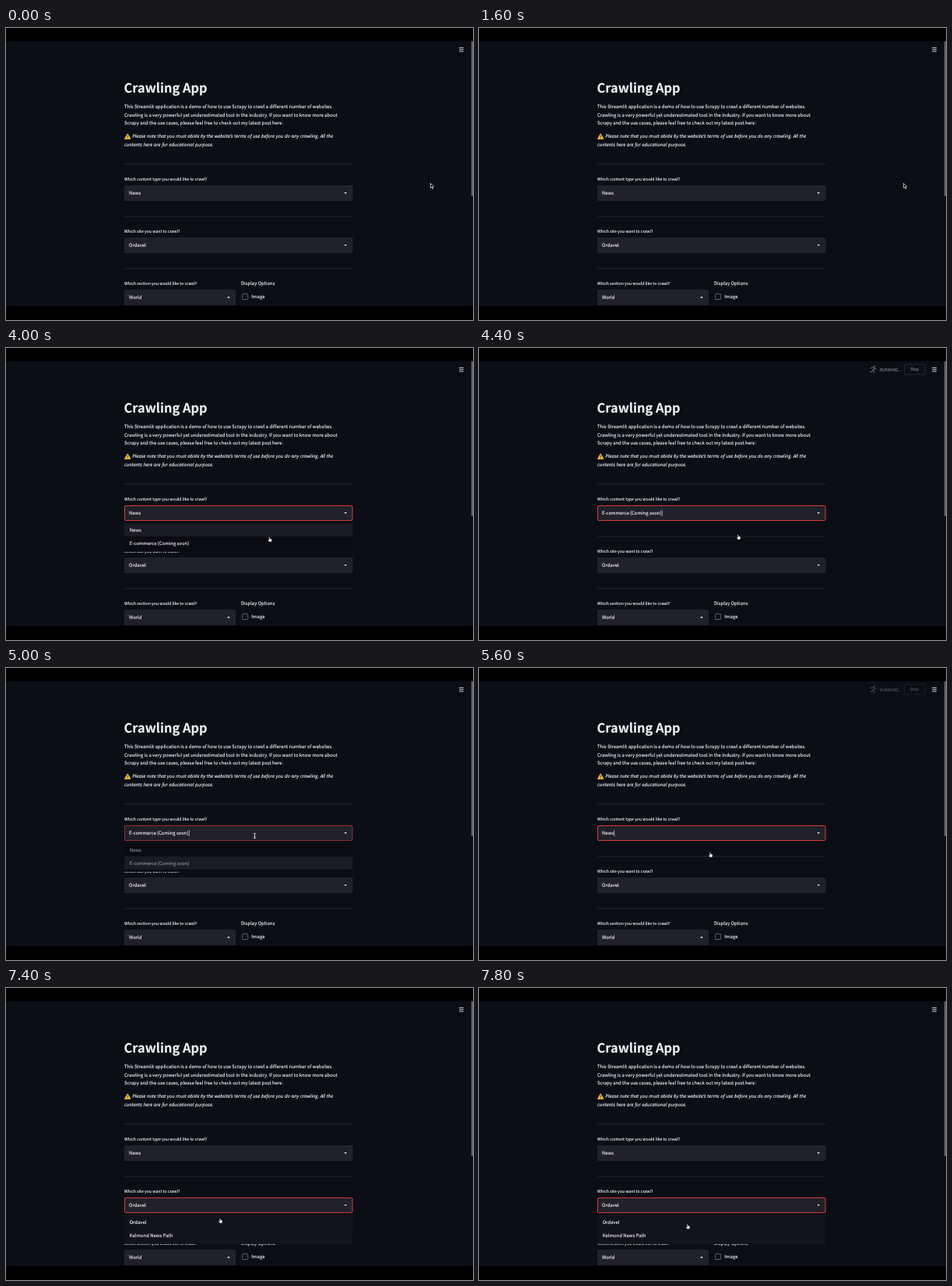
These frames come from a looping animation (600 px wide and 375 px high, 8000 ms). An HTML page:

```html
<!DOCTYPE html>
<html lang="en">
<head>
<meta charset="utf-8">
<title>Crawling App</title>
<style>
  html, body { margin: 0; width: 100%; height: 100%; overflow: hidden; background: #000; }
  svg { display: block; width: 100vw; height: 100vh; }
  text {
    font: 5.95px "Noto Sans CJK SC", "Noto Sans CJK JP", "Noto Sans CJK", "Open Sans", sans-serif;
    fill: #f4f4f5;
    stroke: #f4f4f5;
    stroke-width: .12;
    text-rendering: geometricPrecision;
    white-space: pre;
  }
  .title { font-size: 16.4px; font-weight: 700; }
  .note { font: italic 6.11px "Open Sans", "Noto Sans", sans-serif; }
  .label, .small { font-size: 5.22px; }
  .box { fill: #21212a; }
  .hr { fill: #26282e; }
  .ring { fill: none; stroke: #d23a3c; }
</style>
</head>
<body>
<svg viewBox="0 0 600 375">
  <defs>
    <clipPath id="page"><rect y="17" width="600" height="340"/></clipPath>
    <path id="chevron" d="M-1.8 -.9H1.8L0 1Z" fill="#f4f4f5"/>
  </defs>
  <rect width="600" height="375"/>
  <g clip-path="url(#page)">
    <rect y="17" width="600" height="340" fill="#0c0e15"/>
    <rect x="597.8" y="17" width="2.2" height="199" rx="1" fill="#626368"/>
    <path d="M582.2 25.4h5.6M582.2 27.7h5.6M582.2 30h5.6" stroke="#e6e6e8" stroke-width=".9"/>

    <g id="running" opacity="0">
      <g fill="none" stroke="#f4f4f5" stroke-width=".9" stroke-linecap="round" stroke-linejoin="round">
        <path d="M503.5 26l1.8-1.6 2.3.7-1.5 3 1.9 1.5-.9 2.2M506.1 28.1l-1 2.2h-2.2M507.6 25.1l.8 1.8h1.7"/>
      </g>
      <circle cx="508.4" cy="23.6" r=".9" fill="#f4f4f5"/>
      <text class="small" x="515" y="30">RUNNING...</text>
      <rect x="546.5" y="21" width="26.5" height="13" rx="1.5" fill="none" stroke="#55565f" stroke-width=".7"/>
      <text class="small" x="554" y="29.4">Stop</text>
    </g>

    <text class="title" x="151.6" y="83">Crawling App</text>
    <text x="152" y="103.3">This Streamlit application is a demo of how to use Scrapy to crawl a different number of websites.</text>
    <text x="152" y="113.8">Crawling is a very powerful yet underestimated tool in the industry. If you want to know more about</text>
    <text x="152" y="124.3">Scrapy and the use cases, please feel free to check out my latest post here:</text>
    <path d="M156.2 135.8L159.9 142.4H152.5Z" fill="#f3b93a" stroke="#f3b93a" stroke-width="1" stroke-linejoin="round"/>
    <path d="M156.2 137.6v2.6M156.2 141.2v.8" stroke="#2c2412" stroke-width=".9"/>
    <text class="note" x="162.2" y="141.4">Please note that you must abide by the website's terms of use before you do any crawling. All the</text>
    <text class="note" x="152" y="152">contents here are for educational purpose.</text>

    <rect class="hr" x="152" y="174.6" width="293.5" height=".8"/>
    <rect class="hr" x="152" y="241.6" width="293.5" height=".8"/>
    <rect class="hr" x="152" y="308.7" width="293.5" height=".8"/>

    <text class="label" x="152" y="195.6">Which content type you would like to crawl?</text>
    <rect class="box" x="152" y="202" width="293.5" height="20" rx="1.5"/>
    <text id="type" x="158" y="214.1">News</text>
    <rect id="caret" y="208" width=".6" height="8" fill="#f4f4f5"/>
    <use href="#chevron" x="436.2" y="212"/>

    <text class="label" x="152" y="262.7">Which site you want to crawl?</text>
    <rect class="box" x="152" y="269" width="293.5" height="20" rx="1.5"/>
    <text x="158" y="281.2">Ordavel</text>
    <use href="#chevron" x="436.2" y="279.1"/>

    <text class="label" x="152" y="329.8">Which section you would like to crawl?</text>
    <rect class="box" x="152" y="336" width="143" height="20" rx="1.5"/>
    <text x="158" y="348.3">World</text>
    <use href="#chevron" x="286" y="346.2"/>
    <text x="302" y="330.2">Display Options</text>
    <rect x="303.6" y="341.4" width="7.2" height="7.2" rx="1" fill="none" stroke="#777880" stroke-width=".8"/>
    <text x="315.3" y="347.4">Image</text>

    <rect id="ring0" class="ring" x="152.5" y="202.5" width="292.5" height="19" rx="1.5"/>
    <rect id="ring1" class="ring" x="152.5" y="269.5" width="292.5" height="19" rx="1.5"/>

    <g id="menu">
      <rect id="panel" x="152" y="223.6" width="293.5" height="38.2"/>
      <rect id="hover" x="152" width="293.5" height="16.7"/>
      <g id="items">
        <text x="158.7" y="235.9"></text>
        <text x="158.7" y="252.5"></text>
      </g>
    </g>

    <g id="cursor">
      <path d="M-1.6 -3.6V2.4L-.2 1.2 .8 3.5 1.8 3.1 .8 .9H2.6Z" fill="#050505" stroke="#f4f4f5" stroke-width=".7"/>
      <path d="M-1.6 -3.2Q0 -3.2 0 -2.2V2.2Q0 3.2 -1.6 3.2M1.6 -3.2Q0 -3.2 0 -2.2M0 2.2Q0 3.2 1.6 3.2M-.9 .9H.9" fill="none" stroke="#f4f4f5" stroke-width=".8"/>
      <path d="M-1.4 -3.4Q-.6 -3.9 -.3 -3L.1 -1.2 2 -.8Q2.7 -.5 2.6 .4L2.1 3H-.9L-2.6 .8Q-2.6 0 -1.7 .2L-1 .7Z" fill="#f4f4f5" stroke="#111" stroke-width=".4"/>
    </g>
  </g>
</svg>
<script>
const LOOP = 8000, TICK = 200;
const ARROW = 0, BEAM = 1, HAND = 2;
const $ = id => document.getElementById(id);
const SHOP = "E-commerce (Coming soon)";
const menus = [
  { items: ["News", SHOP], panel: "#0b0c12", hover: "#1a1b23" },
  { items: ["Ordavel", "Kelmond News Path"], panel: "#12131b", hover: "#11131a" }
];

// time, x, y, pointer shape
const path = [
  [0, 547, 203, ARROW], [1800, 547, 203, ARROW], [2400, 528, 204, ARROW],
  [2800, 475.5, 207, ARROW], [3000, 412, 210, ARROW], [3200, 352, 211, BEAM],
  [3600, 350, 211, BEAM], [3800, 343, 233, HAND], [4000, 339, 246, HAND],
  [4200, 337, 250, HAND], [4600, 330, 236, HAND], [4800, 322, 217, BEAM],
  [5000, 319.5, 215.5, BEAM], [5200, 314, 227, HAND], [5600, 297.5, 240, HAND],
  [6000, 297, 241, HAND], [6400, 293, 258, ARROW], [6600, 289, 276, BEAM],
  [6800, 288, 283, BEAM], [7000, 287, 284, BEAM], [7200, 282, 293, HAND],
  [7600, 269, 305, HAND], [7800, 268.5, 306.5, HAND], [8000, 268.5, 306.5, HAND]
];

// each list: [start, value], held until the next entry
const steps = {
  type: [[0, "News"], [4400, SHOP], [5600, "News"]],
  caret: [[0, 0], [4400, 1], [4800, 0], [5000, 1], [5200, 0], [5600, 1], [6000, 0]],
  ring0: [[0, 0], [3600, .55], [3800, 1], [5000, .6], [5200, 1], [6800, .6], [7000, 0]],
  ring1: [[0, 0], [7000, .6], [7200, 1]],
  running: [[0, 0], [4400, .5], [4600, 0], [5600, .3], [5800, .5], [6000, 0]],
  list: [[0, 0], [7000, 1]],
  menu: [[0, 0], [3600, .55], [3800, 1], [4400, 0], [5000, .55], [5200, 1], [5600, 0], [7000, .55], [7200, 1]],
  row: [[0, 0], [4200, 1], [5400, 0]]
};

const held = (list, t) => list.findLast(s => s[0] <= t)[1];

function moveCursor(t) {
  const i = path.findLastIndex(p => p[0] <= t);
  const [t0, x0, y0, kind] = path[i], [t1, x1, y1] = path[i + 1];
  const k = (t - t0) / (t1 - t0);
  $("cursor").setAttribute("transform", `translate(${x0 + (x1 - x0) * k} ${y0 + (y1 - y0) * k})`);
  [...$("cursor").children].forEach((c, n) => c.setAttribute("visibility", n === kind ? "visible" : "hidden"));
}

function draw(t) {
  const s = {};
  for (const key in steps) s[key] = held(steps[key], t);

  $("type").textContent = s.type;
  $("caret").setAttribute("x", 158.4 + $("type").getComputedTextLength());
  for (const id of ["caret", "ring0", "ring1", "running"]) $(id).setAttribute("opacity", s[id]);

  const menu = menus[s.list];
  $("menu").setAttribute("visibility", s.menu ? "visible" : "hidden");
  $("menu").setAttribute("transform", `translate(0 ${s.list * 67.1})`);
  $("items").setAttribute("opacity", s.menu);
  [...$("items").children].forEach((el, n) => el.textContent = menu.items[n]);
  $("panel").setAttribute("fill", menu.panel);
  $("hover").setAttribute("fill", menu.hover);
  $("hover").setAttribute("y", 225.3 + s.row * 16.7);
  moveCursor(t);
}

const begin = performance.now();
function loop() {
  const t = (performance.now() - begin) % LOOP;
  draw(Math.floor(t / TICK) * TICK);
  requestAnimationFrame(loop);
}
loop();
</script>
</body>
</html>
```
